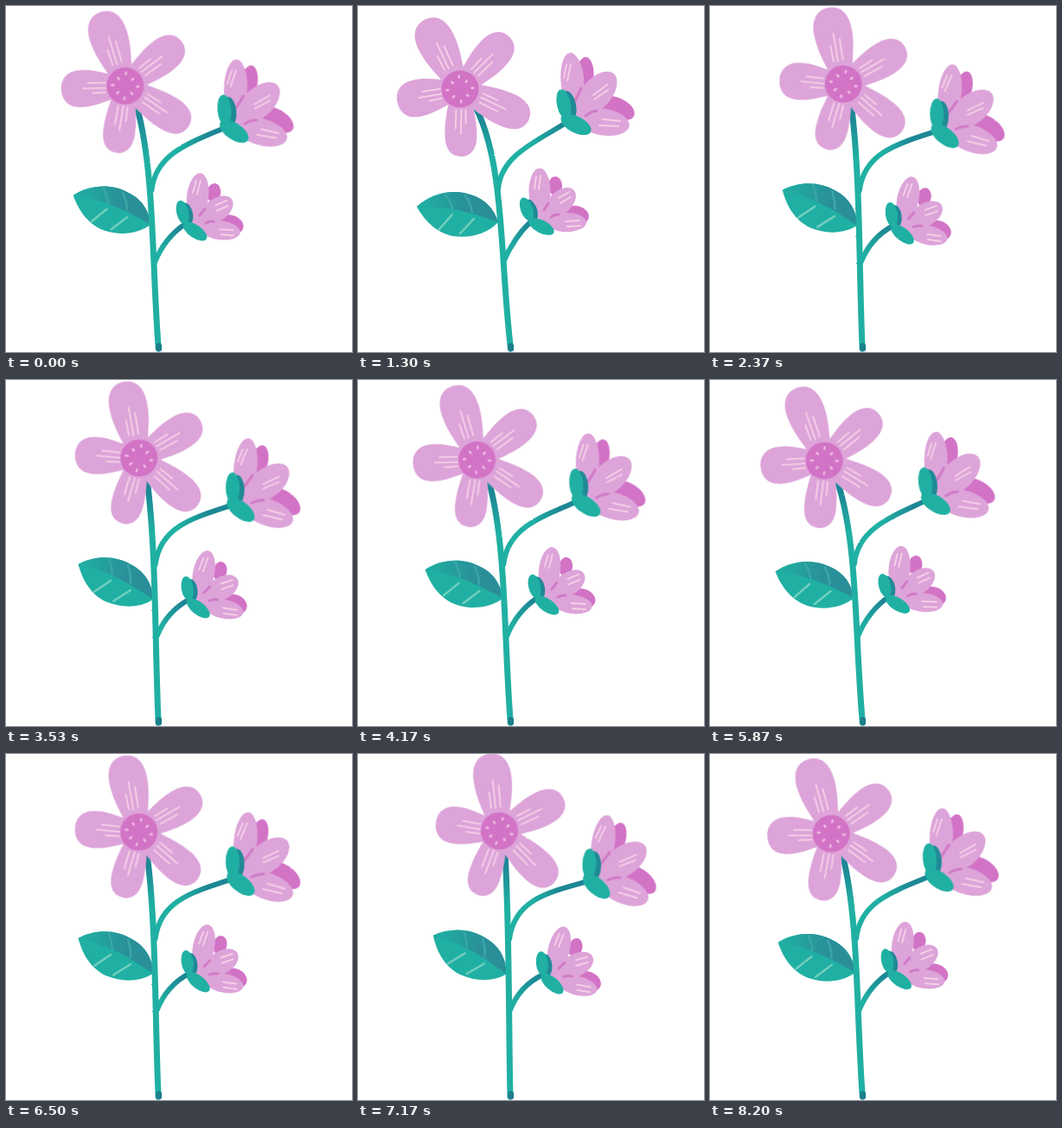
An HTML page that plays this animation: 400x400 px, repeating every 8310 ms.

```html
<!DOCTYPE html>
<html lang="en">
<head>
<meta charset="utf-8">
<title>Swaying flower</title>
<style>
  html, body { margin: 0; width: 100%; height: 100%; overflow: hidden; background: #fff; }
  svg { display: block; width: 100vw; height: 100vh; }
  .line { fill: none; stroke-linecap: round; stroke-linejoin: round; }
  .petal { fill: #dda4d9; }
  .deep { fill: #d273c6; }
  .teal { fill: #20b0a3; }
  .shade { fill: #208996; }
  .glint { stroke: #f5cfe6; stroke-width: 1.9; }
  .fold { stroke: #d07bc8; stroke-width: 3; }
  .rib { stroke: #74cfc0; stroke-width: 2.4; }
</style>
</head>
<body>
<svg viewBox="0 0 400 400">
  <defs>
    <filter id="rough" filterUnits="userSpaceOnUse" x="0" y="0" width="400" height="400" color-interpolation-filters="sRGB">
      <feTurbulence type="fractalNoise" baseFrequency=".35" numOctaves="2" seed="4"/>
      <feDisplacementMap in="SourceGraphic" scale="1.5" xChannelSelector="R" yChannelSelector="G"/>
    </filter>
    <linearGradient id="stemInk" gradientUnits="userSpaceOnUse" x1="0" y1="130" x2="0" y2="176">
      <stop offset="0" stop-color="#1d8795"/><stop offset="1" stop-color="#20b0a3"/>
    </linearGradient>
    <linearGradient id="highInk" gradientUnits="userSpaceOnUse" x1="200" y1="0" x2="234" y2="0">
      <stop offset="0" stop-color="#20b0a3"/><stop offset="1" stop-color="#1d8795"/>
    </linearGradient>
    <linearGradient id="lowInk" gradientUnits="userSpaceOnUse" x1="176" y1="284" x2="200" y2="256">
      <stop offset="0" stop-color="#20b0a3"/><stop offset="1" stop-color="#1d8795"/>
    </linearGradient>
    <linearGradient id="leafInk" gradientUnits="userSpaceOnUse" x1="74" y1="0" x2="126" y2="0">
      <stop offset="0" stop-color="#20ada2"/><stop offset="1" stop-color="#2a8f99"/>
    </linearGradient>
  </defs>

  <g filter="url(#rough)">
    <g id="leaf">
      <path class="teal" d="M68 232C85 216 110 211 130 218C148 223 158 236 162 250C150 263 130 269 110 266C90 262 77 248 68 232Z"/>
      <path fill="url(#leafInk)" d="M68 232C85 216 110 211 130 218C148 223 158 236 162 250C140 242 110 231 68 232Z"/>
      <path class="line" d="M101 218Q107 226 109 234M124 219Q131 230 132 238" stroke="#3aa7a6" stroke-width="2.4"/>
      <path class="line rib" d="M94 258L109 241M118 263L134 246"/>
    </g>
    <path id="low" class="line" stroke="url(#lowInk)" stroke-width="6"/>
    <path id="high" class="line" stroke="url(#highInk)" stroke-width="6"/>
    <path id="stem" class="line" stroke="url(#stemInk)" stroke-width="7"/>
    <path class="line" d="M176.6 393V396" stroke="#1d7f8c" stroke-width="7"/>

    <g id="lowBud">
      <ellipse class="deep" cx="228" cy="208" rx="8" ry="11"/>
      <ellipse class="deep" cx="252" cy="242" rx="15" ry="11" transform="rotate(10 252 242)"/>
      <circle class="petal" cx="218" cy="238" r="14"/>
      <ellipse class="petal" cx="210" cy="214" rx="12.5" ry="26.5"/>
      <ellipse class="petal" cx="234" cy="227" rx="21" ry="13" transform="rotate(-42 234 227)"/>
      <ellipse class="petal" cx="241" cy="250" rx="23" ry="11"/>
      <path class="line fold" d="M215 236L220 228M223 244Q227 241 232 241"/>
      <path class="line glint" d="M206 197L204 211M211 196L209 212M232 222L244 215M234 228L246 221M240 249L256 248M242 255L257 254"/>
      <ellipse class="shade" cx="200" cy="236" rx="7" ry="13" transform="rotate(-20 200 236)"/>
      <ellipse class="teal" cx="195" cy="235" rx="7" ry="14" transform="rotate(-20 195 235)"/>
      <ellipse class="teal" cx="212" cy="255" rx="16" ry="7.5" transform="rotate(27 212 255)"/>
    </g>

    <g id="highBud">
      <ellipse class="deep" cx="262" cy="81" rx="10.5" ry="22" transform="rotate(4 262 81)"/>
      <ellipse class="deep" cx="299" cy="118" rx="22" ry="12" transform="rotate(24 299 118)"/>
      <circle class="petal" cx="261" cy="117" r="17"/>
      <ellipse class="petal" cx="248" cy="87" rx="13.5" ry="33" transform="rotate(-5 248 87)"/>
      <ellipse class="petal" cx="276" cy="101" rx="30" ry="17" transform="rotate(-49 276 101)"/>
      <ellipse class="petal" cx="283" cy="134" rx="31" ry="15.5" transform="rotate(9 283 134)"/>
      <path class="line fold" d="M251 110L258 95M263 127Q269 122 276 121"/>
      <path class="line glint" d="M241 68L238 83M246 67L242 86M272 103L288 91M273 108L289 97M283 131L303 133M279 138L301 139"/>
      <ellipse class="shade" cx="244" cy="115" rx="8" ry="17" transform="rotate(-12 244 115)"/>
      <ellipse class="teal" cx="238" cy="114" rx="8" ry="18" transform="rotate(-12 238 114)"/>
      <ellipse class="teal" cx="252" cy="137" rx="19" ry="9.5" transform="rotate(27 252 137)"/>
    </g>

    <g id="head"></g>
  </g>
</svg>
<script>
const $ = id => document.getElementById(id);
const { sin, PI, floor, min } = Math;
const LOOP = 8310, SWING = LOOP / 2, FAR_LEFT = 1300, RISE = 1715;

// A petal pointing up from the centre, then turned into place.
function petal(len, half, turn) {
  const y = part => (-len * part).toFixed(1);
  const side = s => [11, 14, half, half, half, half * .58].map(x => (x * s).toFixed(1));
  const [a, b, c, d, e, f] = side(-1), [A, B, C, D, E, F] = side(1);
  const shape = `M${a} 0C${b} ${y(.28)} ${c} ${y(.42)} ${d} ${y(.68)}C${e} ${y(.9)} ${f} ${y(1)} 0 ${y(1)}` +
    `C${F} ${y(1)} ${E} ${y(.9)} ${D} ${y(.68)}C${C} ${y(.42)} ${B} ${y(.28)} ${A} 0Z`;
  const glint = `M-6 ${y(.31)}V${y(.51)}M-1 ${y(.3)}L0 ${y(.66)}M5 ${y(.31)}L6 ${y(.58)}`;
  return `<g transform="rotate(${turn})"><path class="petal" d="${shape}"/>` +
    `<path class="line glint" d="${glint}"/></g>`;
}

function seed(i) {
  return `<ellipse cy="${i % 2 ? -11.5 : -14.5}" rx="1.4" ry="2.4" fill="#f0b6e2" transform="rotate(${i * 45 - 5})"/>`;
}

$('head').innerHTML =
  petal(90, 22, -27) + petal(83, 20, 43) + petal(87, 20, 114) + petal(78, 18.5, 179) + petal(74, 21.5, 258) +
  '<circle class="deep" r="21.5"/>' + Array.from({ length: 8 }, (_, i) => seed(i)).join('');

// 0 is far left, 1 is far right: a quick rise, then a slower, uneven return.
function swayAt(t) {
  const q = (t - FAR_LEFT + LOOP) % SWING;
  if (q < RISE) return sin(PI / 2 * (q / RISE) ** 1.12);
  const y = (q - RISE) / (SWING - RISE);
  return Math.max(0, 1 - y - .06 * sin(PI * y) + .04 * sin(3 * PI * y));
}

// The pose is held on steps of 400/3 ms, restarting every 1300 ms.
function held(t) {
  const r = t % 1300;
  return t - r + min(9, floor((r + 3.4) / 133.34)) * 400 / 3;
}

// A stalk is one cubic curve, blended between its two extremes.
function bend(id, left, right, f) {
  const [x, y, ...rest] = left.map((v, i) => (v + (right[i] - v) * f).toFixed(2));
  $(id).setAttribute('d', `M${x} ${y}C${rest.join(' ')}`);
}

function lean(id, px, py, dx, dy, turn, f) {
  $(id).setAttribute('transform',
    `translate(${px + dx * f} ${py + dy * f}) rotate(${turn * f}) translate(${-px} ${-py})`);
}

function draw(t) {
  const u = swayAt(held(t)), mid = u ** .85, soft = u ** .8;
  bend('stem', [176.5, 396, 164, 290, 169.5, 185, 137, 119], [176, 396, 174, 300, 175, 200, 170, 113], u);
  bend('high', [162, 212, 165, 172, 208, 156, 242, 134], [175, 214, 181, 170, 215, 161, 266, 147], mid);
  bend('low', [168, 296, 175, 280, 186, 262, 200, 249], [176, 296, 183, 278, 195, 264, 214, 255], soft);
  lean('leaf', 162, 250, 9.5, 4.5, 17, u ** .68);
  lean('highBud', 245, 130, 25.5, 14.5, 13.5, mid);
  lean('lowBud', 200, 246, 15, 8, 14, soft);
  $('head').setAttribute('transform',
    `translate(${118 + 45.5 * u} ${96 - 7 * soft}) rotate(${19.5 * u})`);
}

function tick() {
  draw(performance.now() % LOOP);
  requestAnimationFrame(tick);
}
tick();
</script>
</body>
</html>
```
